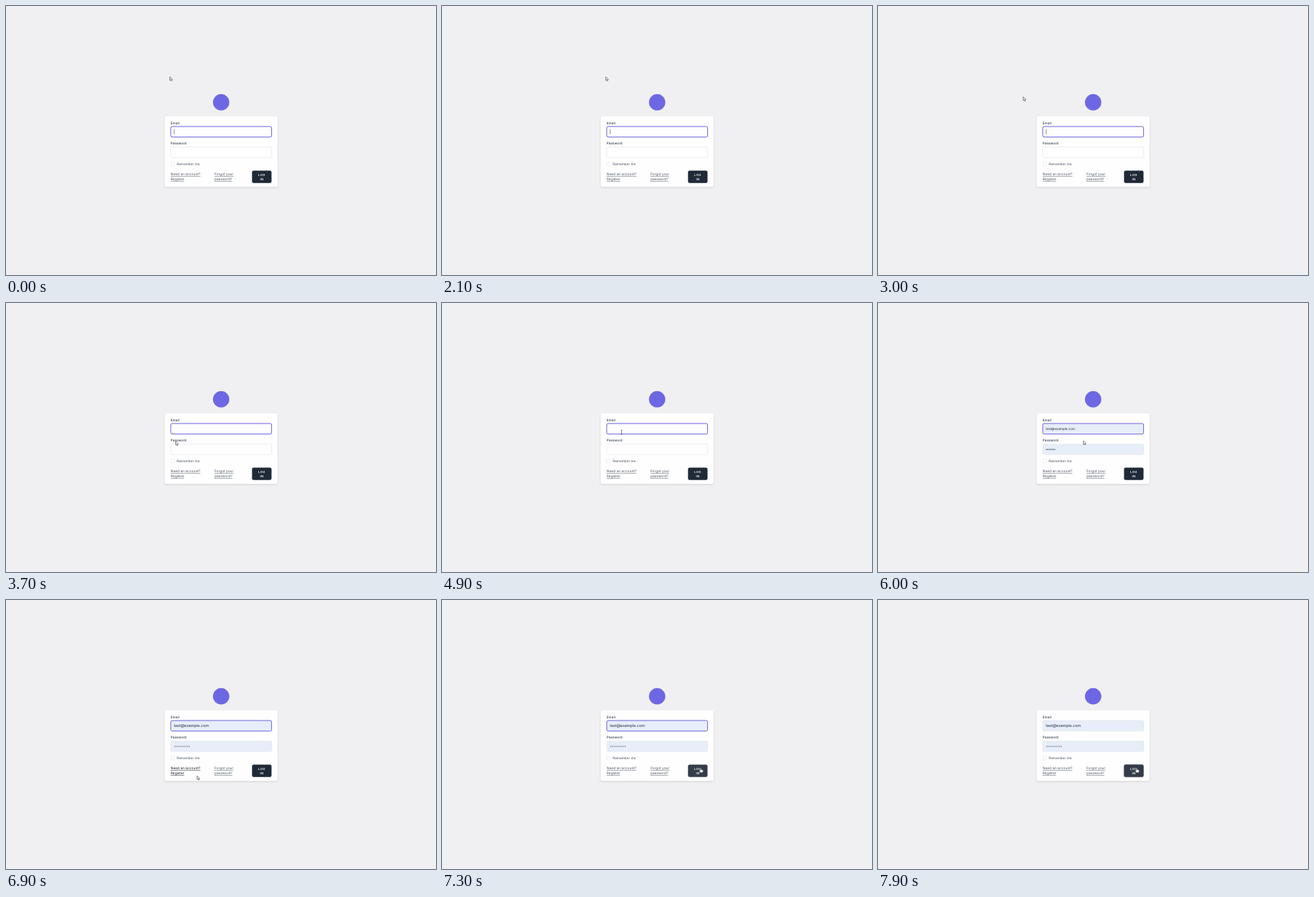
Write an HTML page that moves like this. It is 600 px wide and 375 px high and loops after 8 s.

```html
<!DOCTYPE html>
<html lang="en">
<head>
<meta charset="utf-8">
<title>Log in</title>
<style>
  html, body { margin: 0; width: 100%; height: 100%; overflow: hidden; background: #f0f0f2; }
  svg { display: block; width: 100vw; height: 100vh; }
  text { font: 4.85px Inter, sans-serif; fill: #4b5563; text-rendering: geometricPrecision; white-space: pre; }
  .label { font-size: 4.7px; font-weight: 500; fill: #374151; }
  .link text { text-decoration: underline; text-decoration-thickness: .4px; text-underline-offset: .5px; }
  .link.hover text { fill: #111827; }
  .button text { font-size: 4.2px; font-weight: 600; letter-spacing: .4px; fill: #fff; text-anchor: middle; }
  .card { fill: #fefefe; filter: drop-shadow(0 1px 1px #0002); }
  .field { fill: #fefefe; stroke: #dcdee3; stroke-width: .5; }
  .field.filled { fill: #e7eef9; }
  .field.focus { stroke: #6b63dd; stroke-width: 1; }
  .value { fill: #1f2937; }
  .cursor { fill: #fff; stroke: #33343a; stroke-width: .6; stroke-linejoin: round; }
</style>
</head>
<body>
<svg viewBox="0 0 600 375">
  <circle cx="300.2" cy="134.2" r="11.4" fill="#6d67e4"/>
  <rect class="card" x="221.4" y="153.8" width="157.6" height="98.4" rx="2.8"/>

  <text class="label" x="229.8" y="164.8">Email</text>
  <rect class="field" id="email" x="229.9" y="168" width="140.7" height="14.7" rx="2"/>
  <text class="value" id="address" x="234.2">test@example.com</text>
  <path id="caret" d="M234.7 171.7v7" stroke="#444" stroke-width=".6"/>

  <text class="label" x="229.8" y="193.4">Password</text>
  <rect class="field" id="password" x="229.9" y="196.7" width="140.7" height="14.6" rx="2"/>
  <g class="value" id="dots"></g>

  <rect class="field" x="230" y="217.7" width="5.4" height="5.4" rx="1.3"/>
  <text x="238.2" y="222" style="font-size:4.7px">Remember me</text>

  <g class="link" id="register">
    <text x="229.8" y="236.3">Need an account?</text>
    <text x="229.8" y="243.3">Register</text>
  </g>
  <g class="link">
    <text x="290.9" y="236.3">Forgot your</text>
    <text x="290.9" y="243.3">password?</text>
  </g>
  <g class="button">
    <rect id="login" x="343.3" y="229.5" width="27.2" height="17.2" rx="2.2"/>
    <text x="357" y="237">LOG</text>
    <text x="357" y="242.6">IN</text>
  </g>

  <g class="cursor" id="cursor">
    <path id="arrow" d="M0 0V5L1.2 4 2 5.8 3 5.4 2.2 3.6H3.7Z"/>
    <path id="beam" d="M-1.1-3Q0-3 0-2.2 0-3 1.1-3M0-2.2V2.2M-1.1 3Q0 3 0 2.2 0 3 1.1 3" fill="none"/>
    <path id="hand" d="M-.7.4Q0-.4.6.4V2.3L3 3Q3.7 3.3 3.4 4.4L2.7 6.8H-.4L-2.4 4Q-2.2 3-.7 3.9Z"/>
  </g>
</svg>
<script>
const LOOP = 8000, STEP = 100;
const PREVIEW = 6000, FILL = 6300, CLICK = 7800;
const byId = id => document.getElementById(id);
const show = (id, on) => byId(id).style.display = on ? '' : 'none';

// Pointer hotspot: time, x, y
const track = [
  [0, 228.5, 98.7], [2700, 228.5, 98.7], [3100, 194, 136], [3200, 194, 136],
  [3300, 166, 160], [3700, 236.7, 193], [3800, 236.7, 193], [4200, 250.6, 180.2],
  [5300, 250.6, 180.2], [5600, 286.6, 192.2], [6100, 286.6, 192.2], [6400, 283, 205],
  [6500, 283, 205], [6900, 266.7, 245.2], [7000, 266.7, 245.2], [7300, 361, 234], [LOOP, 361, 234]
];
const blinks = [200, 700, 1200, 1700, 2300, 2800, 3300, 3900, 4400, 5100, 5500];

function pointerAt(t) {
  const i = track.findIndex(p => p[0] > t);
  const [t0, x0, y0] = track[i - 1], [t1, x1, y1] = track[i];
  const k = (t - t0) / (t1 - t0);
  return [x0 + (x1 - x0) * k, y0 + (y1 - y0) * k];
}

function cursorKind(x, y) {
  const inside = (l, top, r, b) => x > l && x < r && y > top && y < b;
  if (inside(230, 231, 271, 244.5) || inside(290, 231, 318, 244.5) || inside(343, 229, 371, 247)) return 'hand';
  if (inside(230, 168, 371, 183) || inside(230, 197, 371, 211)) return 'beam';
  return 'arrow';
}

function draw(t) {
  const preview = t >= PREVIEW, filled = t >= FILL;
  const [x, y] = pointerAt(t);
  const kind = cursorKind(x, y);
  byId('cursor').setAttribute('transform', `translate(${x} ${y})`);
  for (const id of ['arrow', 'beam', 'hand']) show(id, id === kind);

  show('caret', !preview && blinks.filter(b => b <= t).length % 2 === 0);
  for (const id of ['email', 'password']) byId(id).classList.toggle('filled', preview);
  byId('email').classList.toggle('focus', t < CLICK);

  const address = byId('address');
  show('address', preview);
  address.style.fontSize = filled ? '5.4px' : '4.5px';
  address.setAttribute('y', filled ? 177.2 : 176.9);

  show('dots', preview);
  const [start, pitch, radius] = filled ? [235.7, 2.83, .72] : [234.9, 1.7, .7];
  byId('dots').innerHTML = Array.from({ length: 8 }, (_, i) =>
    `<circle cx="${start + i * pitch}" cy="204.1" r="${radius}"/>`).join('');

  byId('register').classList.toggle('hover', t >= 6700 && t < 7100);
  const login = byId('login');
  login.setAttribute('fill', t >= 7300 ? '#353c49' : '#1f2937');
  login.setAttribute('stroke', t >= CLICK ? '#4a5068' : 'none');
  login.setAttribute('stroke-width', .6);
}

function frame() {
  draw(Math.floor(performance.now() % LOOP / STEP) * STEP);
  requestAnimationFrame(frame);
}
frame();
</script>
</body>
</html>
```
